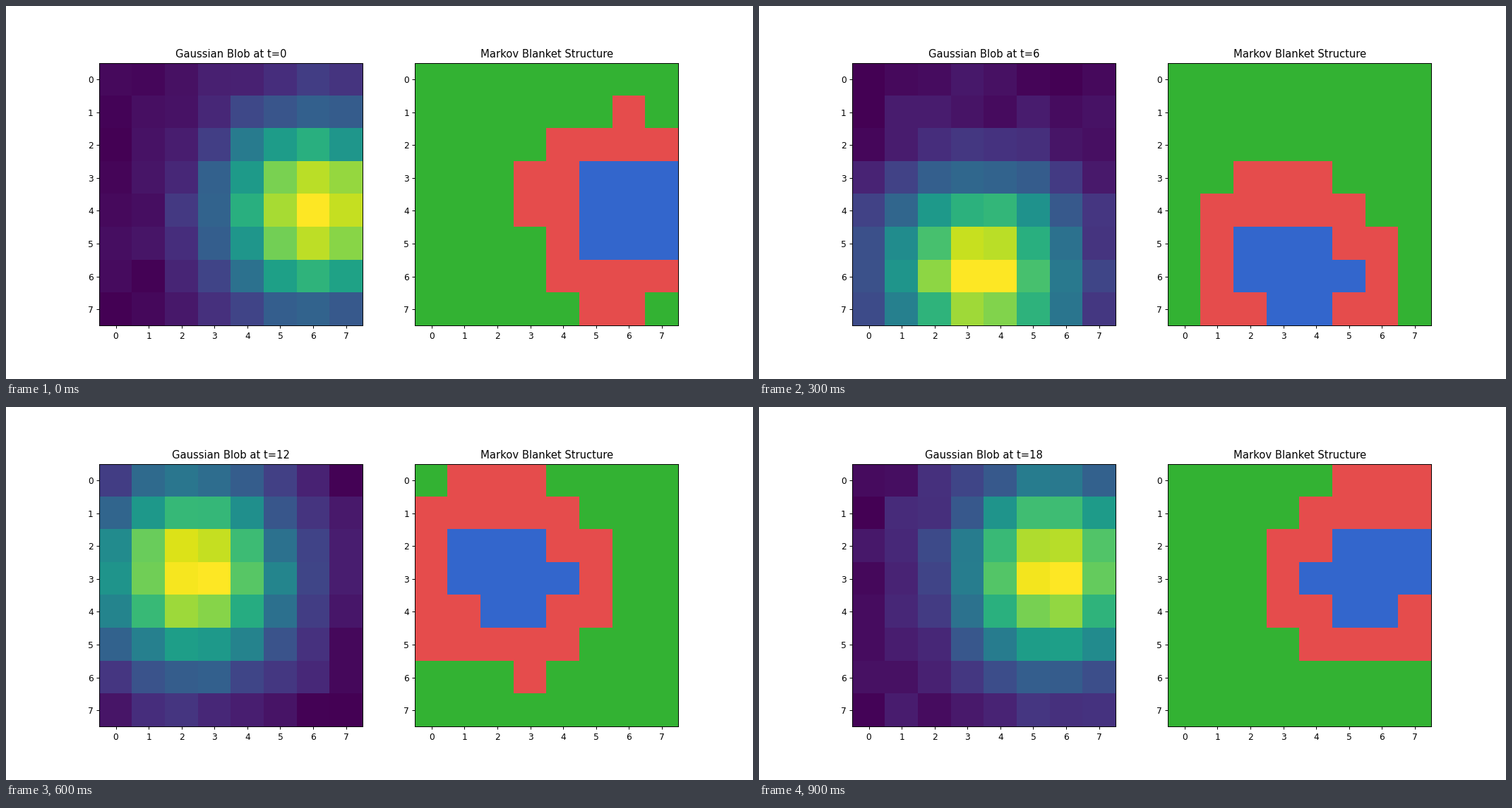
Animation, 1058 px wide and 529 px high, one loop 1000 ms. Source, as a matplotlib script:

```python
import numpy as np
import matplotlib.pyplot as plt
from matplotlib.animation import FuncAnimation
from matplotlib.colors import ListedColormap

N, STEPS, STRIDE = 8, 20, 2
SIGMA, NOISE = 2.0, 0.02
LOW, HIGH = 0.3, 0.7


def blob_series():
    """Noisy Gaussian circling the grid centre, each step scaled to 0..1."""
    np.random.seed(42)
    y, x = np.mgrid[:N, :N]
    series = []
    for t in range(STEPS):
        a = 2 * np.pi * t / STEPS
        cx = N / 2 + N / 4 * np.cos(a)
        cy = N / 2 + N / 4 * np.sin(a)
        blob = np.exp(-((x - cx) ** 2 + (y - cy) ** 2) / (2 * SIGMA ** 2))
        blob += NOISE * np.random.randn(N, N)
        series.append((blob - blob.min()) / (blob.max() - blob.min()))
    return series


def regions(blob):
    """0 = external, 1 = blanket, 2 = internal."""
    return (blob > LOW).astype(int) + (blob > HIGH)


series = blob_series()
roles = ListedColormap([(0.2, 0.7, 0.2), (0.9, 0.3, 0.3), (0.2, 0.4, 0.8)])

fig, (ax_blob, ax_role) = plt.subplots(1, 2, figsize=(12, 6), dpi=1058 / 12)
blob_img = ax_blob.imshow(series[0], cmap="viridis", vmin=0, vmax=1)
role_img = ax_role.imshow(regions(series[0]), cmap=roles, vmin=0, vmax=2,
                          interpolation="nearest")
title = ax_blob.set_title("Gaussian Blob at t=0")
ax_role.set_title("Markov Blanket Structure")
for ax in (ax_blob, ax_role):
    ax.set_xticks(range(N))
    ax.set_yticks(range(N))


def update(i):
    t = i * STRIDE
    blob_img.set_data(series[t])
    role_img.set_data(regions(series[t]))
    title.set_text(f"Gaussian Blob at t={t}")
    return blob_img, role_img, title


anim = FuncAnimation(fig, update, frames=STEPS // STRIDE, interval=100,
                     repeat=True, repeat_delay=0, blit=False)
plt.show()
```
